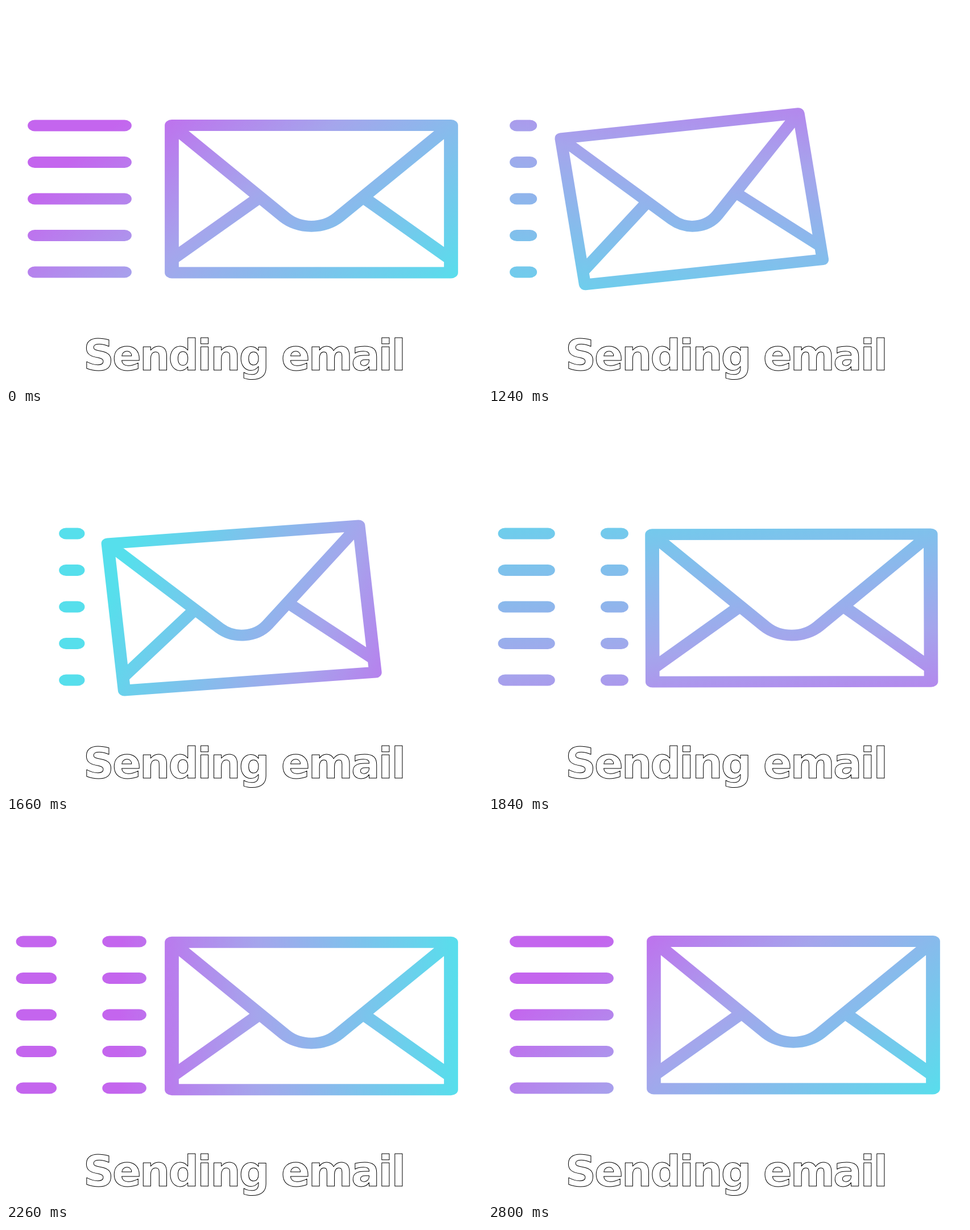
Write an HTML page with a canvas that moves like this. It is 837 by 669 pixels and loops after 2830 ms.

```html
<!DOCTYPE html>
<html lang="en">
<head>
<meta charset="utf-8">
<title>Sending email</title>
<style>
  html, body { margin: 0; width: 100%; height: 100%; overflow: hidden; background: #fff; }
  canvas, svg { position: absolute; left: 0; top: 0; }
  text {
    font: bold 75px "DejaVu Sans", sans-serif;
    letter-spacing: -2.9px;
    fill: #fff;
    stroke: #000;
    stroke-width: 1;
    stroke-linejoin: round;
  }
</style>
</head>
<body>
<canvas width="837" height="669"></canvas>
<svg width="837" height="669"><text x="136" y="641">Sending email</text></svg>
<script>
const W = 837, H = 669, LOOP = 2830, HOLD = 1030, STEP = 30, END = 2800;
const STRETCH = 1.25;            // the icon is drawn on a square, widened to the stage
const ctx = document.querySelector('canvas').getContext('2d');

const envelope = new Path2D(
  'M-196.4-129.75H196.4V129.75H-196.4Z' +
  'L-37.5 32.5A53 53 0 0 0 37.5 32.5L196.4-129.75' +
  'M-196.4 106.5L-74 -2M196.4 106.5L74 -2');

// Gradient direction in degrees over time
const turns = [[1030, 52], [1510, 153], [1840, 264], [2080, 326], [2440, 396], [2800, 411]];

function angleAt(t) {
  const i = Math.max(1, turns.findIndex(([time]) => t <= time));
  const [t0, a0] = turns[i - 1], [t1, a1] = turns[i];
  return a0 + (a1 - a0) * (t - t0) / (t1 - t0);
}

// How far the envelope is pulled back: 0 at rest, about 1 at the far left
function pullAt(t) {
  if (t < 1480) return 1.02 - 0.57 * (1 - Math.sin((t - HOLD) / 450 * Math.PI / 2));
  if (t < 1870) return 0.51 * (1 + Math.cos((t - 1480) / 390 * Math.PI));
  return 0;
}

function speedLines(left, right) {
  if (right - left < 26) return;
  ctx.beginPath();
  for (let i = 0; i < 5; i++) {
    const y = 210.5 + 64.5 * i;
    ctx.moveTo((left + 12.5) / STRETCH, y);
    ctx.lineTo((right - 12.5) / STRETCH, y);
  }
  ctx.stroke();
}

function drawLines(t, pull, still) {
  if (still || t < 1570) return speedLines(38, 221 - 162 * pull);
  const period = 205, limit = Math.min(247, 250 - 195 * pull);
  const start = (69 - 0.5565 * (t - 2440) + 10 * period) % period;
  for (const left of [start - period, start, start + period])
    speedLines(Math.max(17.5, left), Math.min(limit, left + 125));
}

function drawEnvelope(pull, drop) {
  ctx.translate(429.6 - 172 * pull, 339.75 + drop);
  ctx.rotate(-0.158 * pull);
  ctx.scale(1 - 0.17 * pull, 1);
  ctx.stroke(envelope);
}

function tint(degrees) {
  const a = degrees * Math.PI / 180, dx = 300 * Math.cos(a), dy = 300 * Math.sin(a);
  const g = ctx.createLinearGradient(500 - dx, 345 - dy, 500 + dx, 345 + dy);
  g.addColorStop(0, '#c465ee');
  g.addColorStop(0.4, '#a5a5ec');
  g.addColorStop(1, '#56dfec');
  ctx.setTransform(1, 0, 0, 1, 0, 0);
  ctx.globalCompositeOperation = 'source-in';
  ctx.fillStyle = g;
  ctx.fillRect(0, 0, W, H);
  ctx.globalCompositeOperation = 'source-over';
}

function draw(now) {
  const time = now % LOOP;
  const still = time < HOLD || time >= END;
  const t = still ? END : HOLD + STEP * Math.floor((time - HOLD) / STEP);
  const pull = pullAt(t);
  ctx.setTransform(1, 0, 0, 1, 0, 0);
  ctx.clearRect(0, 0, W, H);
  ctx.setTransform(STRETCH, 0, 0, 1, 0, 0);
  ctx.lineWidth = 19.8;
  ctx.lineJoin = 'round';
  ctx.lineCap = 'round';
  drawLines(t, pull, still);
  ctx.lineCap = 'butt';
  drawEnvelope(pull, !still && t >= 1570 ? 1.75 : 0);
  tint(angleAt(t));
}

const begin = performance.now();
(function frame() {
  draw(performance.now() - begin);
  requestAnimationFrame(frame);
})();
</script>
</body>
</html>
```
